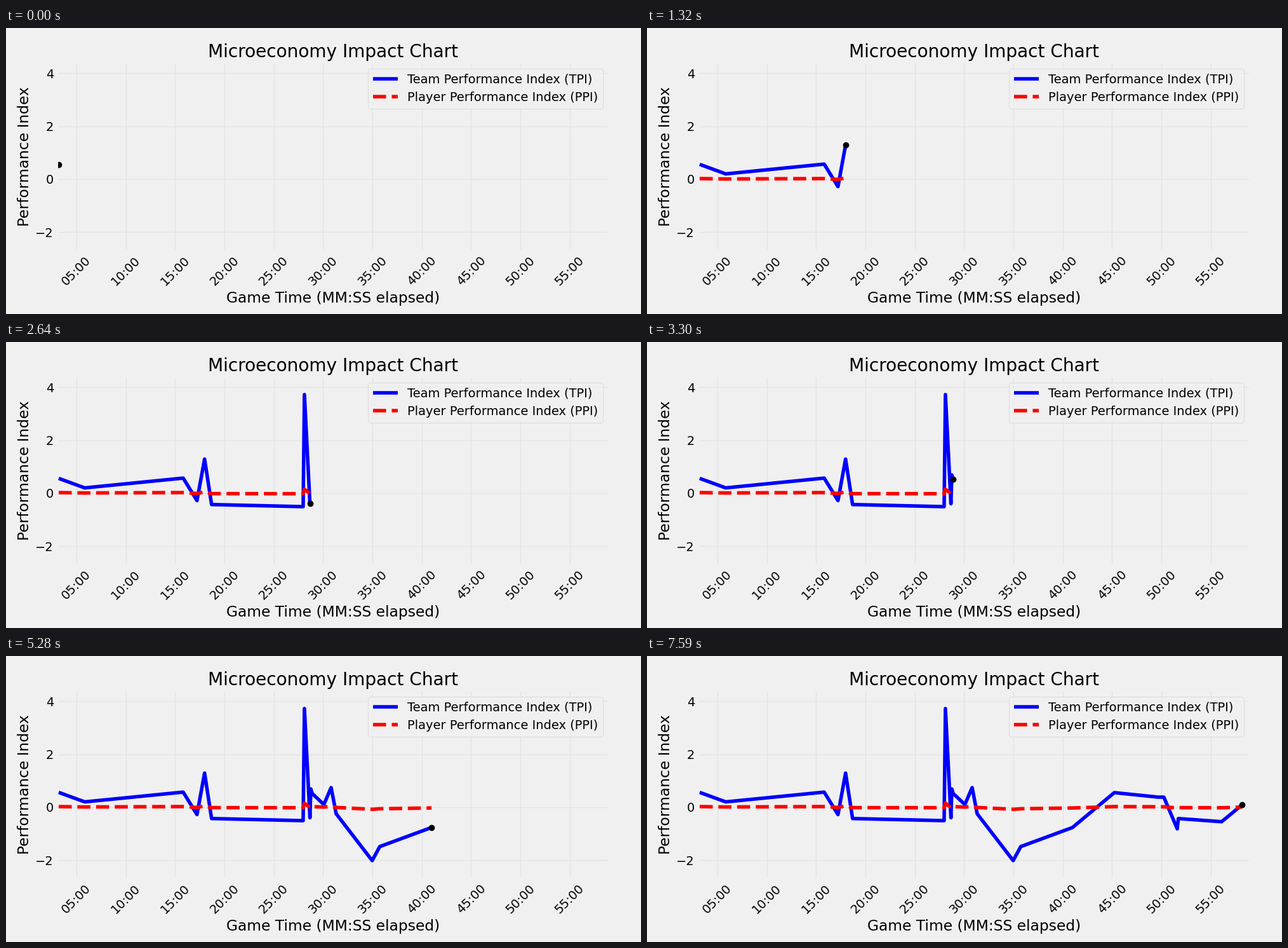
A matplotlib script for the animation above (7.92 s loop, 1000 by 450 pixels).

```python
import matplotlib.pyplot as plt
import numpy as np
from matplotlib.animation import FuncAnimation

PLAYER_SHARE = 0.04
STEP_MS = 330

# Turning points of the match: minutes elapsed, team index
events = np.array([
    (3.19, 0.56), (5.83, 0.20), (15.81, 0.57), (17.21, -0.28),
    (17.98, 1.29), (18.69, -0.43), (27.97, -0.51), (28.10, 3.73),
    (28.66, -0.40), (28.75, 0.69), (28.88, 0.52), (30.07, 0.10),
    (30.81, 0.74), (31.32, -0.25), (34.97, -2.02), (35.74, -1.49),
    (40.98, -0.77), (45.22, 0.55), (49.67, 0.38), (50.24, 0.38),
    (51.60, -0.82), (51.71, -0.43), (56.10, -0.55), (58.18, 0.09),
])
minutes, team = events.T
player = PLAYER_SHARE * team

plt.style.use("fivethirtyeight")
fig, ax = plt.subplots(figsize=(10, 4.5), dpi=100)
fig.subplots_adjust(left=0.08, right=0.95, bottom=0.22, top=0.88)

team_line, = ax.plot([], [], color="blue", label="Team Performance Index (TPI)")
player_line, = ax.plot([], [], color="red", linestyle="--",
                       label="Player Performance Index (PPI)")
dot, = ax.plot([], [], "ko", markersize=6)

ax.set_xlim(3, 59)
ax.set_ylim(-2.72, 4.42)
ticks = range(5, 60, 5)
ax.set_xticks(ticks, [f"{m:02d}:00" for m in ticks], rotation=45)
ax.set_yticks(range(-2, 5, 2))
ax.grid(True, alpha=0.3)
ax.set_title("Microeconomy Impact Chart")
ax.set_xlabel("Game Time (MM:SS elapsed)")
ax.set_ylabel("Performance Index")
ax.legend(loc="upper right")


def update(i):
    """Reveal the events up to number i and mark the newest one."""
    shown = slice(i + 1)
    team_line.set_data(minutes[shown], team[shown])
    player_line.set_data(minutes[shown], player[shown])
    dot.set_data([minutes[i]], [team[i]])
    return team_line, player_line, dot


anim = FuncAnimation(fig, update, frames=len(events), interval=STEP_MS,
                     repeat=True, repeat_delay=0)
plt.show()
```
